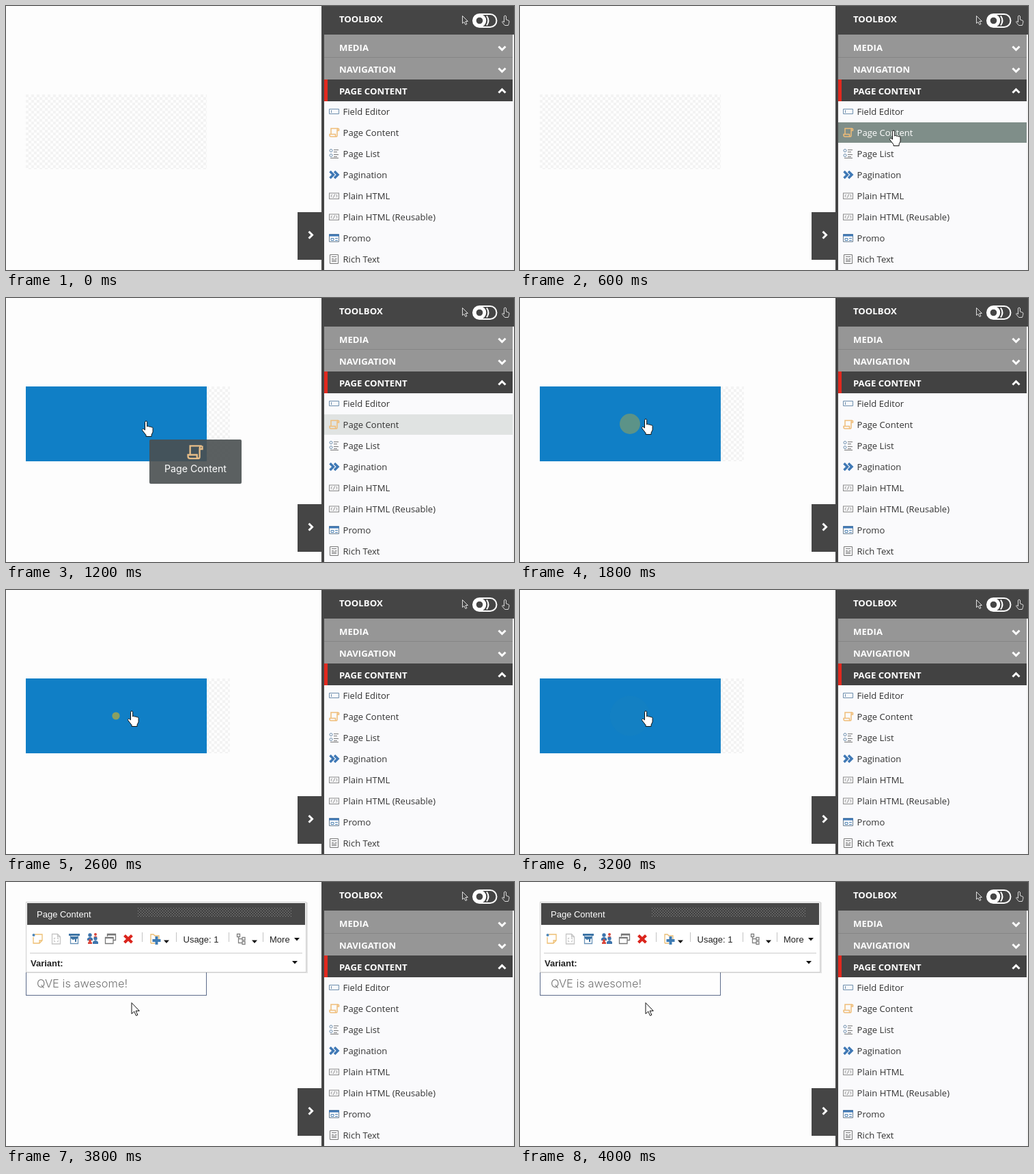
An HTML page that plays this animation: 744 px wide and 388 px high, repeating every 4.2 s.

```html
<!DOCTYPE html>
<html lang="en">
<head>
<meta charset="utf-8">
<title>Toolbox drag and drop</title>
<style>
  html, body { margin: 0; width: 100%; height: 100%; overflow: hidden; background: #fdfdfd; }
  svg { display: block; width: 744px; height: 388px; }
  text { white-space: pre; }
  .panel { font: 13.1px "Open Sans", sans-serif; fill: #333; }
  .head { font: bold 13.2px "Open Sans", sans-serif; fill: #fff; }
  .bar { font: 13px "Liberation Sans", Arial, sans-serif; fill: #222; }
  .line { fill: none; }
</style>
</head>
<body>
<svg viewBox="0 0 744 388">
  <defs>
    <pattern id="dots" x="29" y="130" width="8" height="8" patternUnits="userSpaceOnUse">
      <path d="M0 0h4v4h-4zM4 4h4v4h-4z" fill="#f3f3f3"/>
    </pattern>
    <pattern id="grip" x="193" y="61" width="4" height="4" patternUnits="userSpaceOnUse">
      <path d="M0 0h1v1h-1zM2 2h1v1h-1z" fill="#8c8c8c"/>
    </pattern>
    <g id="scroll" class="line" stroke-width="1.5">
      <path d="M3 10V1.5H14c-2 0-2 2-2 3V12c0 2-2 2-2.500 0V10H1v1.500c0 1.500 1 2 2 2h8M12 4.500h2.500V1.500"/>
    </g>
    <g id="code" class="line" stroke="#8b8b8b">
      <rect x=".5" y=".5" width="14" height="8.500"/>
      <path d="M4.800 2.500l-2 2.200 2 2.200M10.200 2.500l2 2.200-2 2.200M8.500 2l-2 5.500"/>
    </g>
    <path id="down" class="line" d="M-5-2.500L0 2.500 5-2.500" stroke="#fff" stroke-width="3"/>
    <path id="tri" d="M-4-2h8L0 2.500z" fill="#111"/>
    <path id="sep" d="M.5 97v14" stroke="#c4c4c4"/>
  </defs>

  <rect id="zone" x="29" y="130" height="110" fill="url(#dots)"/>
  <rect id="drop" x="29" y="130" width="265" height="110" fill="#107fc6"/>
  <circle id="pulse" cx="161" cy="185" fill="#a8a84a"/>

  <g id="content">
    <rect x="29.500" y="129.500" width="264" height="37" fill="#fefefe" stroke="#5c6b8b"/>
    <text x="45" y="155" style="font:300 16.500px Inter,sans-serif" fill="#747474">QVE is awesome!</text>
    <g id="toolbar" class="bar">
      <rect id="shade" x="30" y="53" width="412" fill="#000" opacity=".1"/>
      <rect id="frame" x="29.500" y="52.500" width="410" fill="#fff" stroke="#cfcfcf"/>
      <rect x="31" y="54" width="407" height="32" fill="#474747"/>
      <rect x="193" y="61" width="226" height="14" fill="url(#grip)"/>
      <text x="45" y="75" fill="#fff">Page Content</text>
      <g class="line" stroke-width="1.300">
        <path d="M42 100h11v9l-4 4h-9v-9M53 109h-4v4" stroke="#eebf72"/>
        <circle cx="40.500" cy="101" r="2" fill="#4f87b8"/>
        <path d="M67.500 99.500h8l4 4v10.500h-12zM75.500 99.500v4h4M70 107l2-2M77 107l-2-2M70 109l2 2M77 109l-2 2" stroke="#c5c5c5"/>
        <path d="M92 100.500h16" stroke="#3d74a5" stroke-width="3"/>
        <path d="M94.500 102v11.500h11V102" stroke="#6b94b9"/>
        <path d="M95 103h10v3l-2 1v4h-2v-4l-3 1-3-2z" fill="#3d74a5"/>
        <g stroke="none">
          <g fill="#3e75ad"><circle cx="123" cy="101" r="2.700"/><path d="M119 109v-3q4-4 8 0v3z"/><circle cx="131" cy="106" r="2.700"/><path d="M127 114v-3q4-4 8 0v3z"/></g>
          <g fill="#d9473c"><circle cx="131" cy="100" r="2"/><path d="M128 104q3-3 6 0zM120 114v-2q3-4 6 0v2z"/><circle cx="123" cy="109" r="2"/></g>
        </g>
        <path d="M148.500 103v-3.500h12v9H157M145.500 104.500h11.500v9h-11.500z" stroke="#777"/>
        <path d="M148 100.500h13M145 105h12.500" stroke="#777" stroke-width="2"/>
        <path d="M173.500 101.500l11 10.500M184.500 101.500l-11 10.500" stroke="#db251d" stroke-width="4.200"/>
        <path d="M212 113v-13h4l2 2h6v5M212 113h6" stroke="#e9bd75"/>
        <path d="M220.500 103v12M214.500 109h12" stroke="#3f7cb4" stroke-width="4"/>
        <path d="M338.500 99.500h4v4h-4zM340.500 104v8.500h5M340.500 106.500h5M346 104.500h4v4h-4zM346 110.500h4v4h-4z" stroke="#828282"/>
      </g>
      <use href="#sep" x="199"/><use href="#sep" x="249"/><use href="#sep" x="326"/><use href="#sep" x="376"/>
      <use href="#tri" x="235" y="110.500"/><use href="#tri" x="364" y="110.500"/><use href="#tri" x="426" y="107"/>
      <text x="259.500" y="112">Usage: 1</text>
      <text x="386" y="112">More</text>
      <g id="variant">
        <path d="M35 127.500h399" stroke="#ccc"/>
        <text x="36" y="147" font-weight="bold">Variant:</text>
        <use href="#tri" x="423" y="141"/>
      </g>
    </g>
  </g>

  <rect x="427" y="303" width="36" height="70" fill="#454545"/>
  <path class="line" d="M443.500 331.500l5 5-5 5" stroke="#fff" stroke-width="3"/>

  <g class="panel">
    <path d="M462 0h282v388h-282z" fill="#454545"/>
    <path d="M466 140h278v248h-278z" fill="#fafafc"/>
    <path d="M742 42h2v346h-2z" fill="#f4f4f4"/>
    <path d="M466 42h276v66h-276z" fill="#969696"/>
    <path d="M466 75.500h276" stroke="#858585"/>
    <path d="M466 108h276v32h-276z" fill="#424242"/>
    <path d="M466 108h5v32h-5z" fill="#e1291f"/>
    <g class="head">
      <text x="488" y="24">TOOLBOX</text>
      <text x="488" y="66">MEDIA</text>
      <text x="488" y="98">NAVIGATION</text>
      <text x="488" y="130">PAGE CONTENT</text>
    </g>
    <use href="#down" x="726.500" y="62"/><use href="#down" x="726.500" y="94"/>
    <use href="#down" transform="translate(726.500 125) scale(1 -1)"/>
    <g class="line" stroke="#fff">
      <path d="M668.500 14.500v11l2.500-2 2 4 2-1-2-4h3.500z" stroke="#ddd"/>
      <rect x="684" y="12" width="34.500" height="19" rx="9.500" stroke-width="2"/>
      <circle cx="693.500" cy="21.500" r="7.300" stroke-width="5"/>
      <path d="M704 14.500q5 7 0 14" stroke-width="2"/>
      <path d="M729.500 24v-9q1.500-2 3 0v5l4 1.500q1 1 0 4l-1 3h-5l-4-5q0-2 3 0" stroke="#ddd"/>
    </g>
    <rect id="hover" x="466" width="276" height="30"/>
    <g id="items"></g>
    <g class="line" stroke="#6d8ead">
      <path d="M473.500 151.500h14v7h-14zM476.500 153v4"/>
      <use href="#scroll" x="473" y="178.500" stroke="#efbd78"/>
      <circle cx="476" cy="212.500" r="2"/><circle cx="476" cy="219.500" r="2"/>
      <path d="M480 211.500h7M480 214.500h5M480 218.500h7M480 221.500h5M475 223.500h12" stroke="#777"/>
      <path d="M474.500 243l5 5-5 5M481 243l5 5-5 5" stroke="#3f78b5" stroke-width="3.500"/>
      <use href="#code" x="473" y="274.500"/><use href="#code" x="473" y="305.500"/>
      <path d="M473.500 335.500h14v11h-14z" stroke="#6a7f92"/>
      <path d="M473 337h15" stroke="#3f78b5" stroke-width="3"/>
      <path d="M476 341.500h4v3h-4zM482 341.500h4M482 344.500h4" stroke="#4f83b4"/>
      <path d="M474.500 365.500h12v13h-12zM477 368.500h7M477 371.500h3M481.500 371.500h3M477 373.500h7M477 375.500h7" stroke="#777"/>
    </g>
  </g>

  <g id="ghost">
    <rect width="135" height="65" rx="2" fill="#4a4f50" opacity=".9"/>
    <use href="#scroll" transform="translate(55 7) scale(1.550)" stroke="#e6bd88"/>
    <text x="67.500" y="48" text-anchor="middle" style="font:14.200px Inter,sans-serif" fill="#fff">Page Content</text>
  </g>
  <g fill="#fff" stroke="#111" stroke-linejoin="round">
    <path id="hand" d="M-1.500 13V1.500a1.600 1.600 0 0 1 3.200 0V8c.8-1 2.600-.8 2.900.4c.9-.8 2.400-.5 2.700.6c1-.6 2.800 0 2.800 1.300V16l-2 4v2.500h-8V20.500L-5 14c-1.400-2 .8-3.600 2.300-2z"/>
    <path id="arrow" transform="translate(184 177.500)" d="M0 0v16.200l3.800-3.500 2.700 6.200 2.400-1-2.700-6h5.100z"/>
  </g>
</svg>
<script>
const LOOP = 4200, STEP = 200;
const $ = id => document.getElementById(id);
const set = (id, attrs) => { for (const k in attrs) $(id).setAttribute(k, attrs[k]); };
const show = (id, on) => { $(id).style.display = on ? '' : 'none'; };
const move = (id, x, y) => set(id, { transform: `translate(${x} ${y})` });

const names = ['Field Editor', 'Page Content', 'Page List', 'Pagination',
  'Plain HTML', 'Plain HTML (Reusable)', 'Promo', 'Rich Text'];
$('items').innerHTML = names.map((n, i) => `<text x="493.5" y="${160 + 31 * i}">${n}</text>`).join('');
const labels = $('items').children;

// time, x, y of the fingertip
const path = [[200, 570, 240], [400, 550, 189], [600, 547, 183], [800, 517, 190],
  [1000, 257, 207], [1200, 205, 181], [1400, 184, 178]];

function pointer(t) {
  const i = path.findIndex(p => p[0] >= t);
  if (i < 0) return path[path.length - 1].slice(1);
  if (i === 0) return path[0].slice(1);
  const [a, b] = [path[i - 1], path[i]], k = (t - a[0]) / (b[0] - a[0]);
  return [a[1] + (b[1] - a[1]) * k, a[2] + (b[2] - a[2]) * k];
}

// cubic-bezier(.42, 0, .58, 1)
function easeInOut(x) {
  let lo = 0, hi = 1, u;
  for (let i = 0; i < 20; i++) {
    u = (lo + hi) / 2;
    if (1.26 * u * (1 - u) ** 2 + 1.74 * u * u * (1 - u) + u ** 3 < x) lo = u; else hi = u;
  }
  return u * u * (3 - 2 * u);
}

function draw(t) {
  const [x, y] = pointer(t);
  const dragged = t >= 1000, done = t >= 3400, variant = t >= 3600;

  show('zone', !done);
  set('zone', { width: dragged ? 299 : 265 });
  show('drop', dragged && !done);

  const loading = t >= 1300 && !done;
  show('pulse', loading);
  if (loading) {
    const k = easeInOut((t - 1300) % 1000 / 1000);
    set('pulse', { r: 30 * k, opacity: 1 - k });
  }

  const row = t >= 400 ? 1 : 3;
  const lit = t >= 200 && t < 1000;
  show('hover', t >= 200 && t < 1400);
  set('hover', { y: 140 + 31 * row, fill: lit ? '#7f8e89' : '#e0e3e2' });
  [...labels].forEach((l, i) => l.setAttribute('fill', lit && i === row ? '#fff' : '#333'));

  show('ghost', t >= 800 && t < 1400);
  move('ghost', x + 5, y + 27);
  show('hand', t >= 200 && !done);
  move('hand', x, y);
  show('arrow', done);

  show('content', done);
  show('variant', variant);
  move('toolbar', 0, variant ? -23 : 0);
  const height = variant ? 103 : 78;
  set('frame', { height });
  set('shade', { height: height + 1 });
}

function tick(now) {
  draw(Math.floor(now % LOOP / STEP) * STEP);
  requestAnimationFrame(tick);
}
draw(0);
requestAnimationFrame(tick);
</script>
</body>
</html>
```
